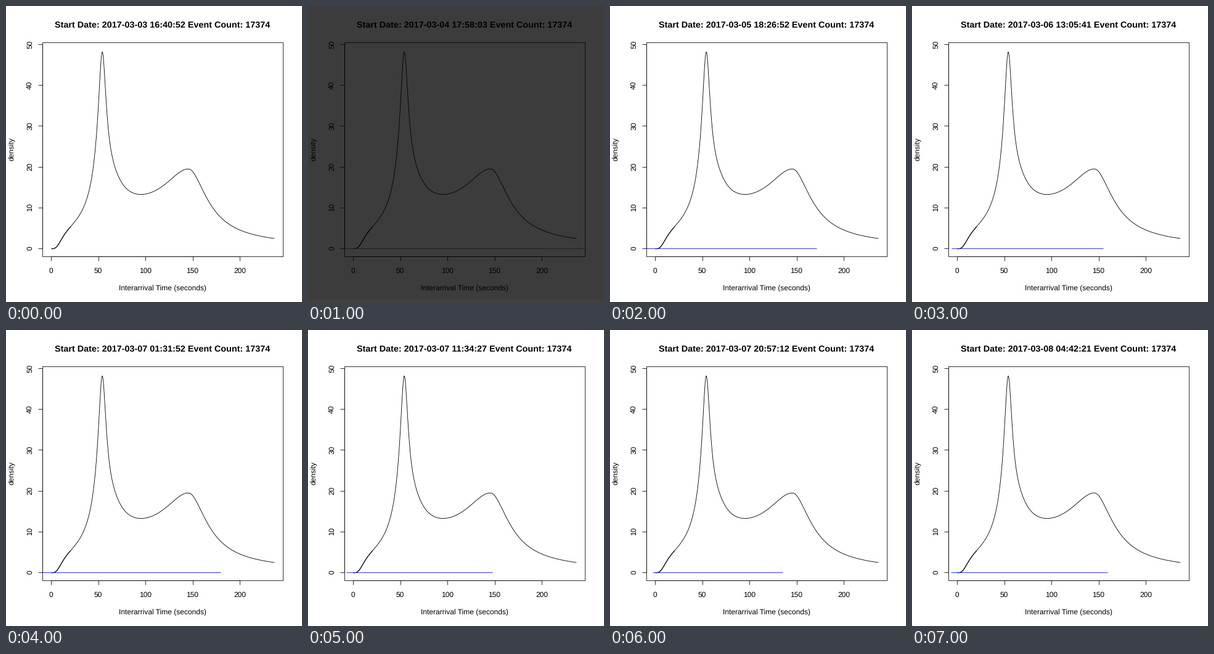
Write a matplotlib script that moves like this. It is 480 px wide and 480 px high and loops after 8 s.

```python
import numpy as np
import matplotlib.pyplot as plt
from matplotlib.animation import FuncAnimation
from matplotlib.patches import Rectangle

plt.rcParams["font.family"] = "Liberation Sans"
plt.rcParams["text.hinting"] = "none"

SIZE = 480
LEFT, RIGHT, TOP, BOTTOM = 59, 449, 59, 406
BASE = 393
X0, DX, DY = 73, 76.5, 66.2   # origin and tick spacing
THIN = 0.8

# Timestamp, then start and end of the flat density
STEPS = [
    ("2017-03-03 16:40:52", None),
    ("2017-03-04 17:58:03", (59, 449)),
    ("2017-03-05 18:26:52", (59, 335)),
    ("2017-03-06 13:05:41", (64, 310)),
    ("2017-03-07 01:31:52", (59, 348)),
    ("2017-03-07 11:34:27", (62, 299)),
    ("2017-03-07 20:57:12", (69, 280)),
    ("2017-03-08 04:42:21", (63, 317)),
]
DARK_STEP = 1


def density(x):
    """Height of the main curve: a sharp resonance and a lopsided hump."""
    u = x - 73.5
    rise = u**3 / (u**3 + 17**3)
    v = x - 156.1
    peak = 322 * rise / np.sqrt(1 + (v / 6.7) ** 2)

    d = np.abs(x - 297)
    hump = np.where(x < 297,
                    114 / np.sqrt(1 + (d / 42) ** 2),
                    114 / (1 + (d / 36.5) ** 1.85))
    onset = 1 - np.exp(-(np.maximum(v, 0) / 14) ** 2)
    return peak + hump * onset


fig = plt.figure(figsize=(SIZE / 72, SIZE / 72), dpi=72)
ax = fig.add_axes([0, 0, 1, 1])
ax.set_xlim(0, SIZE)
ax.set_ylim(SIZE, 0)
ax.axis("off")


def line(xs, ys, color="black", lw=THIN, **kw):
    return ax.plot(xs, ys, color=color, lw=lw, solid_capstyle="butt", **kw)[0]


def label(x, y, text, size=12, **kw):
    return ax.text(x, y, text, fontsize=size, ha="center", va="baseline",
                   rotation_mode="anchor", **kw)


strip = ax.add_patch(Rectangle((0, 476), SIZE, 4, fc="#483d41", lw=0))

# Frame and axes
line([LEFT, RIGHT, RIGHT, LEFT, LEFT], [TOP, TOP, BOTTOM, BOTTOM, TOP])
for i in range(6):
    y = BASE - DY * i
    line([52, LEFT], [y, y])
    label(42, y, str(10 * i), rotation=90)
for i in range(5):
    x = X0 + DX * i
    line([x, x], [BOTTOM, 413])
    label(x, 433, str(50 * i))
line([LEFT, LEFT], [BASE - 5 * DY, BASE])
line([X0, X0 + 4 * DX], [BOTTOM, BOTTOM])
label(253.8, 462, "Interarrival Time (seconds)")
label(13.5, 232, "density", rotation=90)
title = label(253.7, 35, "", size=14.4, weight="bold")

# Densities
xs = np.linspace(73.5, 435.3, 1200)
ys = 393.7 - density(xs)
early = xs < 105
line(xs, ys, lw=0.85)
line(xs[early], ys[early], lw=1.1)
flat = line([], [], zorder=3)


def update(step):
    stamp, span = STEPS[step]
    dark = step == DARK_STEP
    fig.set_facecolor("#3c3c3c" if dark else "white")
    strip.set_visible(dark)
    title.set_text(f"Start Date: {stamp} Event Count: 17374")
    flat.set_data(span or [], [BASE, BASE] if span else [])
    flat.set_color("#1c1c1c" if dark else "#0000ff")
    return title, strip, flat


anim = FuncAnimation(fig, update, frames=len(STEPS), interval=1000,
                     repeat=True, repeat_delay=0, blit=False)
plt.show()
```
